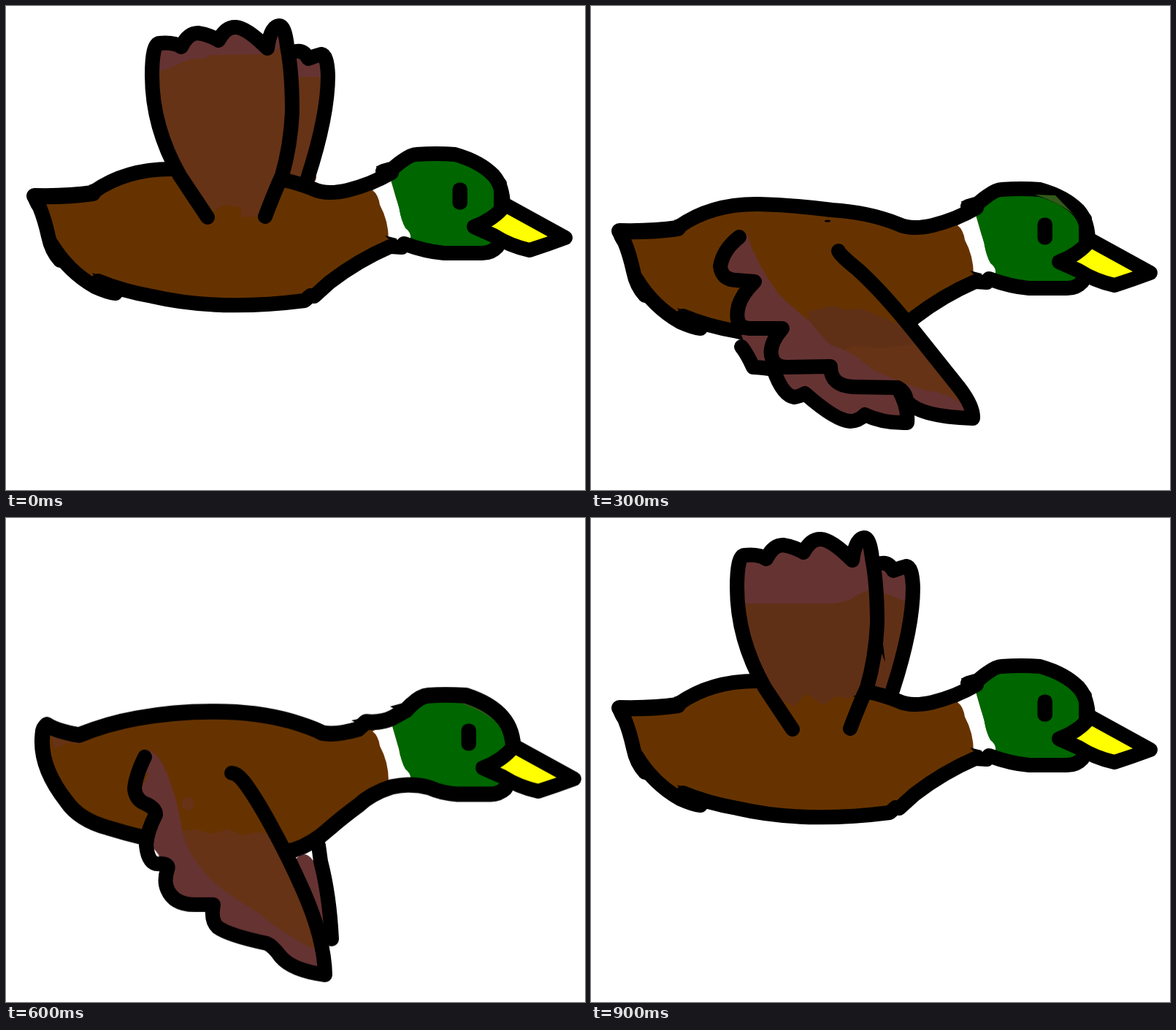
An HTML page that plays this animation: 793x662 px, repeating every 0.93 s.

```html
<!DOCTYPE html>
<html lang="en">
<head>
<meta charset="utf-8">
<title>Flying duck</title>
<style>
  html, body { margin: 0; width: 100%; height: 100%; overflow: hidden; background: #fff; }
  svg { display: block; width: 793px; height: 662px; }
  .ink { fill: none; stroke: #000; stroke-width: 20; stroke-linecap: round; stroke-linejoin: round; }
  .body { fill: #630; }
  .wing { fill: #663316; }
  .dark { fill: #603016; }
  .tip { fill: #633; }
  .moss { fill: #33591a; }

  /* 31 ticks of 30 ms */
  #bird { animation: bob 930ms infinite; }
  .pose { visibility: hidden; animation: 930ms step-end infinite; }
  .p0 { animation-name: p0; }
  .p1 { animation-name: p1; }
  .p2 { animation-name: p2; }
  .p3 { animation-name: p3; }
  .p4 { animation-name: p4; }
  .p5 { animation-name: p5; }
  .p6 { animation-name: p6; }
  @keyframes bob {
    0% { transform: translateY(0); animation-timing-function: steps(4); }
    12.903% { transform: translateY(19px); animation-timing-function: steps(6); }
    32.258% { transform: translateY(48px); animation-timing-function: steps(4); }
    45.161% { transform: translateY(58px); animation-timing-function: steps(3); }
    54.838% { transform: translateY(54px); animation-timing-function: steps(1); }
    58.064% { transform: translateY(47px); animation-timing-function: steps(5); }
    74.193% { transform: translateY(29px); animation-timing-function: steps(4); }
    87.096% { transform: translateY(13px); animation-timing-function: steps(3); }
    96.774%, 100% { transform: translateY(0); }
  }
  @keyframes p0 { 0% { visibility: visible } 12.903%, 100% { visibility: hidden } }
  @keyframes p1 { 12.903% { visibility: visible } 32.258%, 100% { visibility: hidden } }
  @keyframes p2 { 32.258% { visibility: visible } 54.838%, 100% { visibility: hidden } }
  @keyframes p3 { 54.838% { visibility: visible } 74.193%, 100% { visibility: hidden } }
  @keyframes p4 { 74.193% { visibility: visible } 87.096%, 100% { visibility: hidden } }
  @keyframes p5 { 87.096% { visibility: visible } 96.774%, 100% { visibility: hidden } }
  @keyframes p6 { 96.774%, 100% { visibility: visible } }
</style>
</head>
<body>
<svg viewBox="0 0 793 662">
  <defs>
    <g id="face">
      <path fill="#ff0" stroke="#000" stroke-width="20" stroke-linejoin="round"
        d="M684 272L766 317Q742 326 717 334Q690 328 668 314L641 302Q668 292 684 272Z"/>
      <rect x="611.500" y="241.500" width="20.500" height="37" rx="9.500"/>
    </g>
    <path id="collar" fill="#fff" d="M502 252Q510 258 512 272Q524 294 524 320L552 320Q556 312 547 304Q541 294 538 276L527 238Z"/>

    <g id="bodyA">
      <path class="body" d="M45 265L120 256Q165 225 230 222Q300 226 380 238L437 256Q480 252 532 226L540 328L526 331L443 380L407 402L290 409Q200 402 130 384L85 358L60 330Z"/>
      <path fill="#060" d="M527 238L560 204H615Q680 225 680 280V325L655 338H600L552 324Q558 312 547 304Q541 294 538 276Z"/>
      <use href="#collar"/>
      <g class="ink">
        <path d="M39 260Q40 266 46 275Q53 292 58 315Q62 335 74 348"/>
        <path d="M39 260Q85 261 119 256" stroke-width="22"/>
        <path d="M120 254Q165 222 230 223Q275 224 330 231Q380 234 420 250Q438 259 468 252Q500 244 528 228"/>
        <path d="M516 226L530 222Q552 203 562 203Q590 201 615 203Q650 213 668 232Q682 248 681 280"/>
        <path d="M677 243V285" stroke-width="18"/>
        <path d="M673 329Q665 338 652 338H600Q575 336 545 325L542 330L526 329Q482 348 443 378L422 397"/>
        <path d="M62 325Q85 363 122 384Q140 392 150 393"/>
        <path d="M126 376Q160 390 200 397Q290 418 409 403L417 396"/>
      </g>
      <path d="M507 219L530 217V230L510 230ZM118 365L135 371L130 384ZM113 245L130 240V255ZM519 314L535 318V330ZM421 240L440 248V262Z"/>
      <ellipse cx="324" cy="246" rx="4" ry="1.500"/>
      <use href="#face"/>
    </g>

    <g id="bodyB">
      <path class="body" d="M55 244L100 256Q180 226 280 225Q370 228 445 257L540 225L540 326L490 345L425 403Q400 420 350 418Q240 412 140 384Q50 360 50 270Z"/>
      <path class="wing" d="M60 254L100 264L108 270L84 268L66 276Z"/>
      <path fill="#060" d="M527 238L575 203H628Q692 225 692 280V325L672 338H618L552 324Q558 312 547 304Q541 294 538 276Z"/>
      <path class="moss" d="M610 208L660 212L684 252Q658 222 610 210Z"/>
      <use href="#collar"/>
      <g class="ink" stroke-width="21.500">
        <path style="stroke-width:21.500" d="M56 243Q70 252 100 257Q140 241 180 234Q230 225 280 225Q340 224 390 238Q420 247 433 254Q450 258 482 249L493 239Q515 241 530 233L548 223Q565 204 578 203Q600 201 630 203Q664 214 680 233Q695 250 695 280"/>
        <path style="stroke-width:21" d="M684 330Q675 338 664 338H618Q598 337 580 329Q555 322 528 328Q500 337 483 353Q460 370 444 384Q420 406 395 414Q375 419 350 418Q290 415 240 408Q185 398 140 384Q100 373 83 348Q45 300 50 256Q50 247 56 243"/>
      </g>
      <path d="M96 262H113V251ZM473 237L492 233V246ZM526 218L548 212V230Z"/>
      <use href="#face" x="12"/>
    </g>

    <path id="upShape" d="M276 289L238 232Q200 165 200 95Q200 52 210 51Q230 49 240 56Q249 37 263 37Q278 39 291 47Q301 28 315 29Q330 30 358 58Q362 28 374 27Q382 27 385 55Q392 90 392 145Q390 190 378 232Q367 256 355 288"/>
    <path id="upFarShape" d="M413 236Q441 150 441 95Q440 67 432 66Q424 68 414 72Q408 60 397 62"/>
    <clipPath id="upClip"><use href="#upShape"/></clipPath>

    <path id="mid" class="ink" d="M209 308Q216 275 228 248Q245 190 290 162M286 165Q340 128 391 123Q392 133 385 142L376 152L404 155Q412 166 411 192Q420 200 430 196Q403 248 378 276Q348 306 323 315"/>
    <path id="midFar" class="ink" d="M419 159Q428 164 458 166Q472 172 472 180Q468 195 470 204Q484 210 484 221Q475 232 432 250Q410 264 390 270"/>
    <g id="midFarWing">
      <path class="tip" d="M408 160L460 166L472 180L470 204L484 220L390 270Z"/>
      <path class="wing" d="M408 165L428 172Q427 187 440 208L446 240L390 270Z"/>
      <use href="#midFar"/>
    </g>
    <path id="midFill" class="wing" d="M222 265Q242 190 290 162Q340 128 391 123L380 152L404 155L411 192L430 196Q405 245 382 272L366 281L345 267L320 262L302 280L270 274L240 270Z"/>
  </defs>

  <g id="bird">
    <g class="pose p0">
      <path class="wing" d="M385 62H432L441 95L418 238L380 240Z"/>
      <path class="tip" d="M390 62H432Q441 68 441 97H390Z"/>
      <circle class="wing" cx="415" cy="234" r="10"/>
      <use href="#upFarShape" class="ink"/>
      <use href="#bodyA"/>
      <path class="wing" clip-path="url(#upClip)" d="M190 20H400V240L352 285L342 291Q333 302 322 290L322 276L300 272L285 280L270 280L190 240Z"/>
      <path class="tip" clip-path="url(#upClip)" d="M190 94Q225 86 235 80Q250 71 272 72L280 67L365 66L380 50V20H190Z"/>
      <use href="#upShape" class="ink"/>
    </g>

    <g class="pose p1">
      <use href="#bodyB"/>
      <g transform="translate(0 -19)">
        <use href="#midFarWing"/>
        <use href="#midFill"/>
        <path class="dark" d="M245 235Q270 218 288 232Q315 212 332 226Q360 228 358 250Q340 270 320 262Q300 280 270 274Q240 268 245 235Z"/>
        <path class="tip" d="M314 148Q350 128 391 123L380 152L404 155L411 192L430 196L397 240Q370 210 352 200Q330 175 314 148Z"/>
        <use href="#mid"/>
      </g>
    </g>

    <g class="pose p2">
      <use href="#bodyA"/>
      <path class="moss" d="M608 210L636 211L662 238Q644 222 608 210Z"/>
      <g transform="translate(0 -48)">
        <path class="tip" d="M206 450L222 494L248 496Q262 540 294 532Q340 567 368 567L376 560L435 571L420 522L260 440Z"/>
        <path class="ink" d="M206 466Q214 476 222 494Q240 495 250 497Q262 532 278 535Q286 534 293 530Q335 567 355 568Q366 568 375 559Q400 571 433 570Q435 548 420 522"/>
        <path class="body" d="M202 316L178 365L223 377L200 425L262 442L246 475L265 494H328L360 521H420Q440 560 524 565Q524 545 440 440L339 336Z"/>
        <path class="wing" d="M300 440L352 468L446 446Q520 535 524 560L400 515Z"/>
        <path class="dark" d="M297 418L332 410L350 416L372 414L412 432L440 440L448 462L400 468L360 465L340 472L300 448Z"/>
        <path class="tip" d="M202 306Q214 306 219 328Q235 365 258 395Q275 412 300 432Q316 453 330 465Q355 470 385 497Q430 518 460 526Q490 528 524 555V565Q450 560 434 545L420 522H360L328 494H265L246 475L262 442H225L200 425L223 377L184 366Q196 361 182 358Q185 330 202 316Z"/>
        <path class="ink" d="M203 316Q181 333 177 356Q179 374 198 375L224 377Q207 394 202 410Q195 440 217 441H262Q244 462 247 478Q250 494 268 494L328 493Q328 520 360 521L420 522Q431 528 432 540Q450 562 523 564Q524 548 505 523L441 443Q400 392 366 361Q340 340 339 335"/>
      </g>
    </g>

    <g class="pose p3">
      <g transform="translate(0 -54)">
        <path class="tip" d="M396 482Q408 466 420 482L432 490L447 590L432 585Z"/>
        <path class="ink" d="M428 462L431 484Q443 530 446 590"/>
      </g>
      <use href="#bodyB"/>
      <g transform="translate(0 -54)">
        <path class="body" d="M189 341L177 385L204 415L192 460L222 488L221 520L255 543H284L290 575L355 598L395 633L438 640Q436 580 405 520L325 375Z"/>
        <path class="wing" d="M200 445L262 440L280 446L305 440L325 448L345 443L366 450L400 510Q430 560 434 610L290 570Z"/>
        <circle class="wing" cx="249" cy="405" r="9"/>
        <path class="tip" d="M192 330Q207 335 215 352Q234 392 241 440Q248 475 280 508Q300 527 345 554Q390 590 432 609L438 640L395 633L355 598L290 575L284 543H255L221 520L222 488L192 460L204 415L180 395L196 362L185 366Z"/>
        <path fill="#fff" d="M199 462L210 476L202 472Z"/>
        <path class="ink" d="M190 341Q177 368 176 385Q178 400 191 405Q205 411 205 420Q193 443 192 462Q195 490 211 487Q224 487 221 495Q216 511 221 522Q230 543 258 543L284 543Q280 565 290 574Q305 585 357 596Q365 599 376 614Q392 633 437 639Q436 590 408 526Q387 478 362 433Q340 393 325 374Q316 363 309 363"/>
      </g>
    </g>

    <g class="pose p4">
      <path class="wing" d="M298 413Q325 426 378 416L390 416Q400 418 408 412Z"/>
      <use href="#bodyA"/>
      <g transform="translate(0 -29)">
        <path class="tip" d="M190 350L225 330L255 325Q267 348 285 362Q310 384 350 391L398 394L412 412L260 411L300 394L206 399L210 385L262 374L200 368Z"/>
        <path class="body" d="M268 372L277 373L270 377ZM310 403L325 399L332 404Z"/>
        <g class="ink">
          <path d="M244 338Q250 330 248 323Q210 327 190 351Q190 367 220 370L262 373Q218 375 207 389Q205 402 222 402Q270 405 301 392Q275 403 260 411Q300 415 410 417"/>
          <path d="M309 313Q330 320 355 343Q400 384 412 410L418 427"/>
        </g>
      </g>
    </g>

    <g class="pose p5">
      <use href="#bodyB"/>
      <g transform="translate(0 -13)">
        <use href="#midFarWing"/>
        <use href="#midFill"/>
        <path class="tip" d="M331 140Q360 126 391 123L380 152L404 155L411 192L430 196L402 232Q385 205 370 190Q345 165 331 140Z"/>
        <use href="#mid"/>
      </g>
    </g>

    <g class="pose p6">
      <path class="dark" d="M385 62H432L441 95L418 238L380 240Z"/>
      <path class="tip" d="M390 62H432Q441 68 441 118L390 98Z"/>
      <path fill="#fff" d="M384 230Q396 229 401 237L384 236Z"/>
      <use href="#upFarShape" class="ink"/>
      <path d="M396 140L403 197L396 180Z"/>
      <use href="#bodyA"/>
      <path class="dark" clip-path="url(#upClip)" d="M190 20H400V240L375 237L352 247L335 244L318 256L294 240L278 258L262 250L190 240Z"/>
      <path class="tip" clip-path="url(#upClip)" d="M190 117H330Q355 114 365 105Q380 97 395 98V20H190Z"/>
      <use href="#upShape" class="ink"/>
    </g>
  </g>
</svg>
</body>
</html>
```
